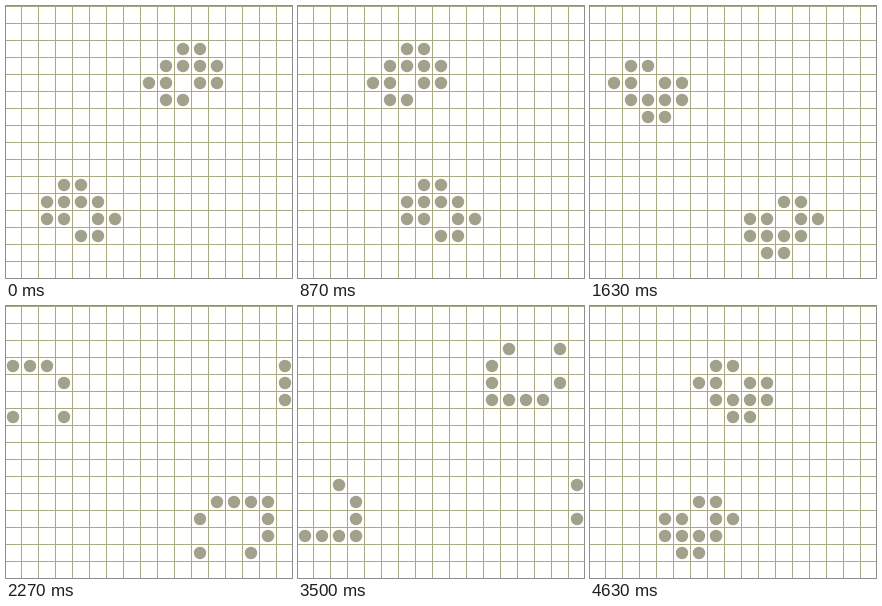
An HTML page with a canvas for the animation above (4.66 s loop, 286 by 272 pixels).

```html
<!DOCTYPE html>
<html lang="en">
<head>
<meta charset="utf-8">
<title>Two spaceships</title>
<style>
  html, body { margin: 0; width: 100%; height: 100%; overflow: hidden; background: #fffffd; }
  canvas { display: block; }
</style>
</head>
<body>
<canvas id="stage" width="286" height="272"></canvas>
<script>
const ctx = document.getElementById('stage').getContext('2d');
const COLS = 17, ROWS = 16, CELL = 17, LEFT = -2;
const LOOP = 4660, HOLD = 30, STEP = 124, LEAD = 20, LAST = 38;

const wrap = (n, size) => (n + size) % size;

function place(grid, col, row, pattern) {
  pattern.forEach((line, y) => [...line].forEach((mark, x) => {
    if (mark === 'o') grid[row + y][col + x] = 1;
  }));
}

function neighbours(grid, x, y) {
  let sum = -grid[y][x];
  for (let dy = -1; dy <= 1; dy++)
    for (let dx = -1; dx <= 1; dx++)
      sum += grid[wrap(y + dy, ROWS)][wrap(x + dx, COLS)];
  return sum;
}

function evolve(grid) {
  return grid.map((line, y) => line.map((alive, x) => {
    const n = neighbours(grid, x, y);
    return n === 3 || (alive && n === 2) ? 1 : 0;
  }));
}

// One ship heads left, its mirror image heads right.
const ship = ['..oo.', '.oooo', 'oo.oo', '.oo..'];
const mirrored = ship.map(line => [...line].reverse().join(''));
const first = Array.from({ length: ROWS }, () => Array(COLS).fill(0));
place(first, 8, 2, ship);
place(first, 2, 10, mirrored);

const generations = [first];
while (generations.length <= LAST) generations.push(evolve(generations.at(-1)));

function generationAt(t) {
  return t < HOLD ? 0 : Math.min(LAST, 1 + Math.floor((t + LEAD) / STEP));
}

function draw(grid) {
  ctx.fillStyle = '#fffffd';
  ctx.fillRect(0, 0, 286, 272);

  ctx.fillStyle = '#a9a983';
  for (let x = 1; x < COLS; x++) ctx.fillRect(LEFT + x * CELL, 0, 1, 272);
  for (let y = 0; y < ROWS; y++) ctx.fillRect(0, y * CELL, 286, 1);

  ctx.fillStyle = '#a2a18c';
  grid.forEach((line, y) => line.forEach((alive, x) => {
    if (!alive) return;
    ctx.beginPath();
    ctx.arc(LEFT + x * CELL + 9, y * CELL + 9, 6.2, 0, Math.PI * 2);
    ctx.fill();
  }));
}

let start = null, shown = -1;

function tick(now) {
  if (start === null) start = now;
  const index = generationAt((now - start) % LOOP);
  if (index !== shown) draw(generations[shown = index]);
  requestAnimationFrame(tick);
}

draw(first);
requestAnimationFrame(tick);
</script>
</body>
</html>
```
